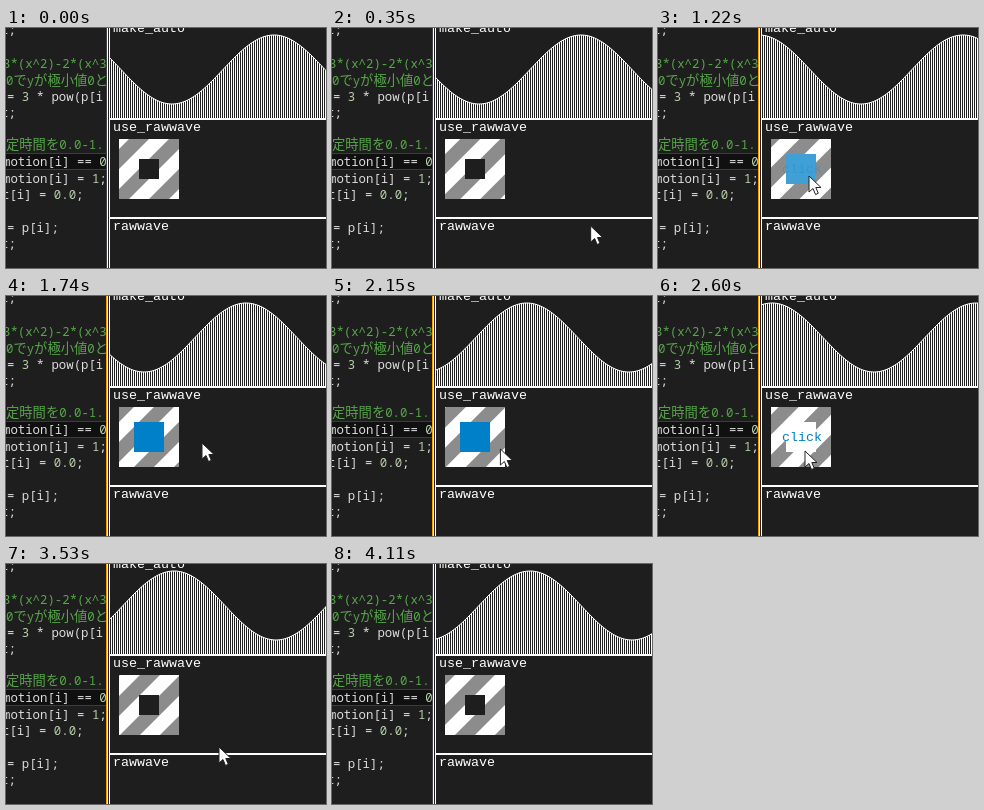
An HTML page that plays this animation: 320 by 240 pixels, repeating every 4.21 s.

```html
<!DOCTYPE html>
<html lang="ja">
<head>
<meta charset="utf-8">
<title>rawwave</title>
<style>
  html, body { margin: 0; width: 100%; height: 100%; overflow: hidden; background: #1e1e1e; }
  svg { display: block; width: 100vw; height: 100vh; }
  text { white-space: pre; }
  .code { font: 500 12.35px "Noto Sans Mono", "Noto Sans CJK JP", "Noto Sans CJK", monospace; fill: #dcdcdc; }
  .code .comment { fill: #57a64a; }
  .code .num { fill: #b5cea8; }
  .cjk { font-size: 13.3px; }
  .label { font: 13.33px "Liberation Mono", monospace; fill: #fff; }
</style>
</head>
<body>
<svg viewBox="0 0 320 240">
  <defs>
    <pattern id="bars" width="2" height="8" patternUnits="userSpaceOnUse">
      <rect x="1" width="1" height="8" fill="#fff" shape-rendering="crispEdges"/>
    </pattern>
    <clipPath id="editor"><rect width="101" height="240"/></clipPath>
    <clipPath id="panel"><rect x="104" width="216" height="90"/></clipPath>
    <clipPath id="box"><rect x="113" y="111" width="60" height="60"/></clipPath>
  </defs>
  <rect width="320" height="240" fill="#1e1e1e"/>

  <g class="code" clip-path="url(#editor)">
    <rect x="-2" y="125.5" width="110" height="16" fill="#101010" stroke="#3c3c3c"/>
    <text x="-5" y="6">t;</text>
    <text class="comment" x="-3" y="40">3*(x^2)-2*(x^3</text>
    <text class="comment" x="0" y="57">0<tspan class="cjk">で</tspan>y<tspan class="cjk">が極小値</tspan>0<tspan class="cjk">と</tspan></text>
    <text x="1" y="73">= <tspan class="num">3</tspan> * pow(p[i</text>
    <text x="-5" y="89">t;</text>
    <text class="comment" x="0" y="121"><tspan class="cjk">定時間を</tspan>0.0-1.</text>
    <text x="-3" y="138">motion[i] == <tspan class="num">0</tspan></text>
    <text x="-3" y="155">motion[i] = <tspan class="num">1</tspan>;</text>
    <text x="-4" y="171">t[i] = <tspan class="num">0.0</tspan>;</text>
    <text x="1" y="204">= p[i];</text>
    <text x="-5" y="220">t;</text>
  </g>

  <g clip-path="url(#panel)">
    <path id="area" fill="url(#bars)"/>
    <path id="crest" fill="none" stroke="#fff"/>
  </g>
  <rect id="focus" x="100" width="1" height="240"/>
  <path d="M101 0h1v240h-1zM103 0h1v240h-1zM104 90h216v2H104zM104 189h216v2H104z" fill="#fff"/>
  <g class="label">
    <text x="107" y="4">make_auto</text>
    <text x="107" y="103">use_rawwave</text>
    <text x="107" y="202">rawwave</text>
  </g>

  <g clip-path="url(#box)">
    <rect x="113" y="111" width="60" height="60" fill="#8c8c8c"/>
    <path id="stripes" fill="#fff"/>
  </g>
  <rect id="core"/>
  <text id="click" class="label" x="124" y="145" style="fill:#0080c8">click</text>
  <path id="cursor" d="M0 0V16L4 12.5L6.5 18.5L9.3 17.3L6.8 11.5H12Z" fill="#fff" stroke="#222" stroke-width="1"/>
</svg>
<script>
const LOOP = 4210, STEP = 57.75, LAST = 71;
const WAVELENGTH = 204, PERIOD = 40;
const $ = id => document.getElementById(id);
const set = (id, attrs) => {
  for (const name in attrs) $(id).setAttribute(name, attrs[name]);
};

// Each key is [step, ...values]; values are interpolated linearly.
const scrollKeys = [[0, 0], [12, 446], [21, 779], [30, 1048], [45, 1582], [61, 2140], [71, 2518]];
const cursorKeys = [[4, 306, 217], [10, 164, 160], [12, 151, 148], [24, 151, 148], [29, 194, 147],
  [30, 196, 147], [34, 196, 150], [39, 150, 155], [45, 147, 155], [50, 150, 158],
  [58, 195, 177], [61, 213, 183], [68, 280, 208], [70, 322, 225]];

// Button values: core size, core r, g, b, label opacity.
const IDLE = [20, 30, 30, 30, 0];
const HOVER = [30, 255, 255, 255, 1];
const ON = [30, 0, 128, 200, 0];
const buttonKeys = [
  [9, ...IDLE], [12, ...HOVER], [18, ...HOVER], [22, ...ON],
  [37, ...ON], [40, ...HOVER], [53, ...HOVER], [56, ...IDLE]
];

function sample(keys, n) {
  const next = keys.findIndex(key => key[0] > n);
  if (next === 0) return keys[0].slice(1);
  if (next < 0) return keys[keys.length - 1].slice(1);
  const a = keys[next - 1], b = keys[next];
  const k = (n - a[0]) / (b[0] - a[0]);
  return a.slice(1).map((v, i) => v + (b[i + 1] - v) * k);
}

function drawWave(scroll) {
  const points = [];
  for (let x = 103; x <= 321; x += 2) {
    const y = 41.5 - 34.5 * Math.cos((x - 268 + scroll) / WAVELENGTH * 2 * Math.PI);
    points.push(`${x} ${y.toFixed(2)}`);
  }
  const line = "M" + points.join("L");
  set("crest", { d: line });
  set("area", { d: line + "V90H103Z" });
}

function drawStripes(scroll) {
  const offset = (30 + scroll * 0.0238) % PERIOD;
  let d = "";
  for (let s = offset - PERIOD; s < 120; s += PERIOD) {
    d += `M${113 + s} 111h20l-60 60h-20z`;
  }
  set("stripes", { d });
}

function drawButton([size, r, g, b, opacity]) {
  set("core", {
    x: 143 - size / 2, y: 141 - size / 2, width: size, height: size,
    fill: `rgb(${[r, g, b].map(Math.round)})`
  });
  set("click", { opacity });
}

function render(time) {
  const n = Math.min(LAST, Math.floor((time % LOOP) / STEP));
  const [scroll] = sample(scrollKeys, n);
  drawWave(scroll);
  drawStripes(scroll);
  drawButton(sample(buttonKeys, n));
  set("focus", { fill: n >= 11 && n < 70 ? "#ff9a00" : "#3f3f46" });
  set("cursor", {
    transform: `translate(${sample(cursorKeys, n)})`,
    visibility: n >= 4 && n < 70 ? "visible" : "hidden"
  });
}

const start = performance.now();
function tick() {
  render(performance.now() - start);
  requestAnimationFrame(tick);
}
tick();
</script>
</body>
</html>
```
